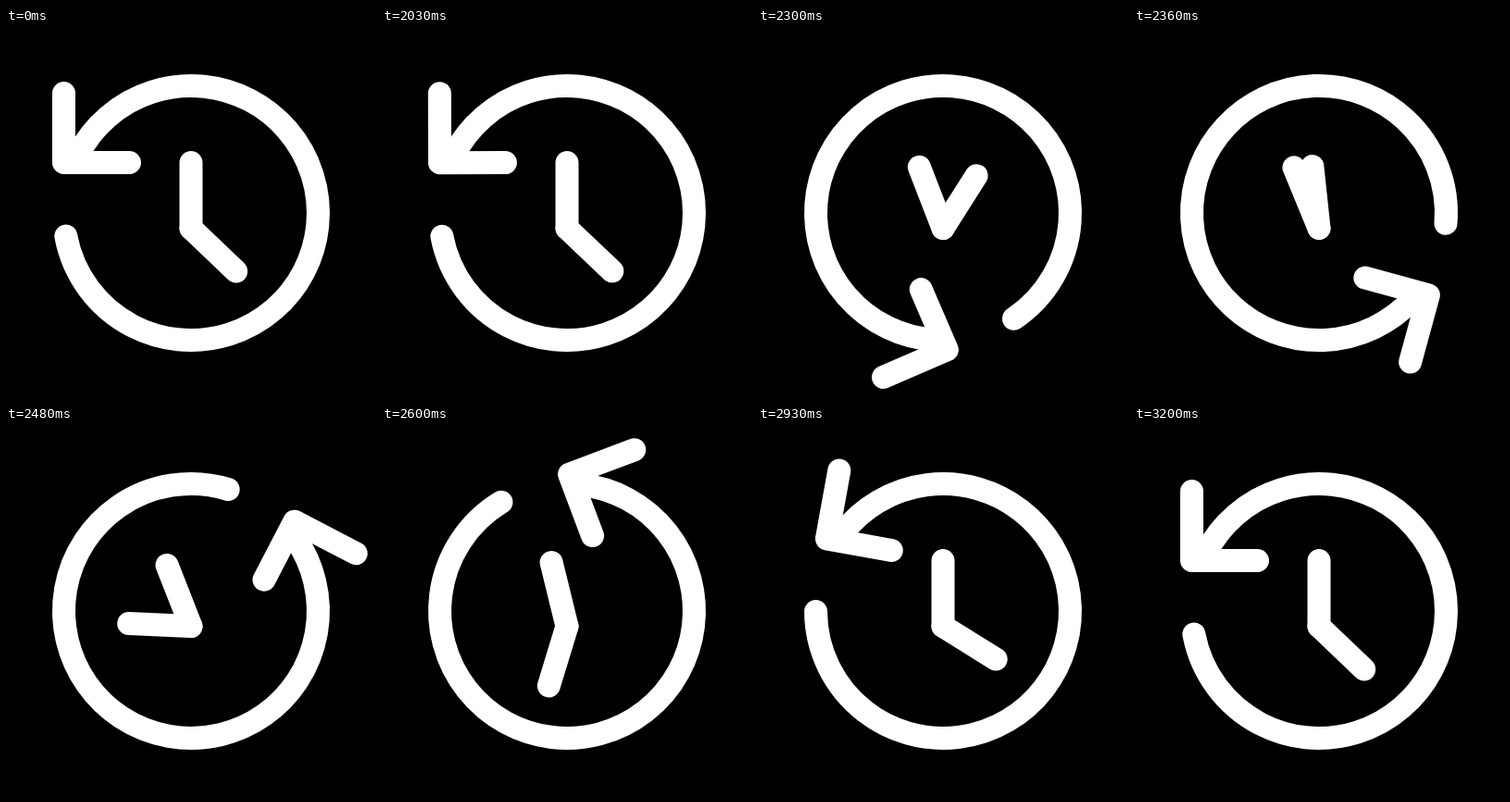
An HTML page with a canvas for the animation above (3230 ms loop, 400x400 px).

```html
<!DOCTYPE html>
<html lang="en">
<head>
<meta charset="utf-8">
<title>History icon</title>
<style>
  html, body { margin: 0; width: 100%; height: 100%; overflow: hidden; background: #000; }
  canvas { display: block; width: 100vw; height: 100vh; }
</style>
</head>
<body>
<canvas id="stage" width="400" height="400"></canvas>
<script>
const ctx = document.getElementById('stage').getContext('2d');
const LOOP = 3230, REST = 2030, STEP = 30;
const RAD = Math.PI / 180;

// Key moments of the move, counted in steps.
const SWING = 13.35, SETTLE = 27.35, END = 39.35;

// Cubic ease from 0 to 1 with flat ends; x1 and x2 are the handle times.
function ease(u, x1 = 1 / 3, x2 = 2 / 3) {
  if (u <= 0) return 0;
  if (u >= 1) return 1;
  let lo = 0, hi = 1;
  for (let i = 0; i < 30; i++) {
    const s = (lo + hi) / 2, r = 1 - s;
    if (3 * s * r * r * x1 + 3 * s * s * r * x2 + s ** 3 < u) lo = s;
    else hi = s;
  }
  return lo * lo * (3 - 2 * lo);
}

const span = (p, from, to) => (p - from) / (to - from);

function line(...points) {
  ctx.beginPath();
  points.forEach(([x, y]) => ctx.lineTo(x, y));
  ctx.stroke();
}

function rotated(x, y, degrees, paint) {
  ctx.save();
  ctx.translate(x, y);
  ctx.rotate(degrees * RAD);
  paint();
  ctx.restore();
}

function arrowRing() {
  ctx.beginPath();
  ctx.arc(0, 0, 137.5, 207.5 * RAD, 529.5 * RAD);
  ctx.stroke();
  line([-137.5, -129.5], [-137.5, -54.5], [-66.5, -54.5]);
}

function draw(time) {
  const t = time % LOOP;
  const p = t < REST ? 0 : Math.floor((t - REST) / STEP) + 0.35;

  const ringTurn = -360 * ease(p / END, 0.335, 0.145);
  const shortTurn = -374 * ease(p / SETTLE) + 14 * ease(span(p, SETTLE, END));
  const longTurn = -22.7 * (ease(p / SWING, 0.55, 0.2) - ease(span(p, SWING, SETTLE)));

  ctx.fillStyle = '#000';
  ctx.fillRect(0, 0, 400, 400);
  ctx.strokeStyle = '#fff';
  ctx.lineWidth = 25;
  ctx.lineCap = ctx.lineJoin = 'round';

  rotated(200, 200, ringTurn, arrowRing);
  rotated(200, 216.5, longTurn, () => line([0, 0], [0, -71]));
  rotated(200, 216.5, shortTurn, () => line([0, 0], [48.7, 46.5]));
}

const start = performance.now();
function tick() {
  draw(performance.now() - start);
  requestAnimationFrame(tick);
}
tick();
</script>
</body>
</html>
```
